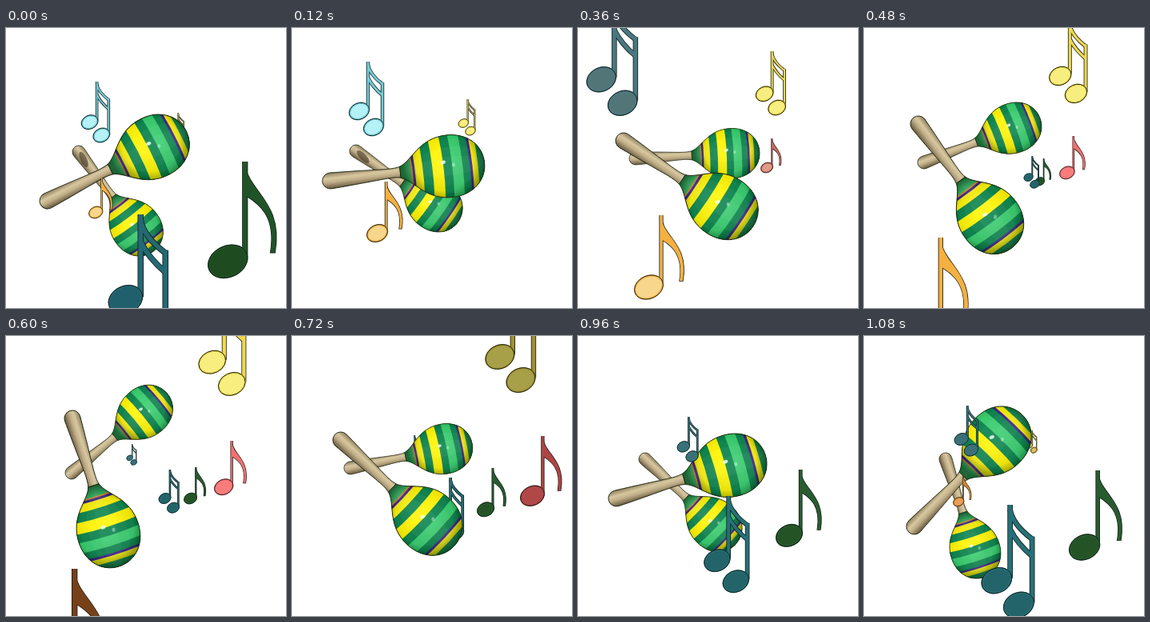
An HTML page with a canvas for the animation above (1200 ms loop, 350 px wide and 350 px high).

```html
<!DOCTYPE html>
<html lang="en">
<head>
<meta charset="utf-8">
<title>Maracas</title>
<style>
  html, body { margin: 0; width: 100%; height: 100%; overflow: hidden; background: #fff; }
  canvas { display: block; width: 350px; height: 350px; }
</style>
</head>
<body>
<canvas id="stage"></canvas>
<script>
const canvas = document.getElementById('stage');
const ctx = canvas.getContext('2d');
const ratio = window.devicePixelRatio || 1;
canvas.width = canvas.height = 350 * ratio;

const STEP = 120, STEPS = 10;

// Poses per step: knob x, knob y, angle in degrees.
const front = [[52, 216, -26.7], [48, 191, -7], [50, 166, 13], [57, 141, 33.4], [68, 120, 53],
  [83, 103, 72.5], [61, 130, 43], [50, 166, 13], [48, 203, -16], [63, 238, -46]];
const back = [[91, 155, 53], [80, 154, 34.5], [75, 157, 16], [72, 163, -3], [75, 168, -21],
  [82, 171, -39.6], [73, 165, -11.5], [75, 158, 16], [84, 154, 43.3], [102, 154, 72]];

// Each note: first step, age at which it passes in front of the maracas,
// age at which it brightens, [head, stem] colours, and left, top, height per step.
const notes = [
  { pair: true, first: 5, over: 3, bright: 5,
    colors: [['#3c7078', '#347880'], ['#b4f2f8', '#74ccd8'], ['#527678', '#487880']],
    path: [[151, 135, 26], [144, 124, 36], [135, 112, 46], [124, 101, 56], [113, 87, 63],
      [94, 67, 76], [71, 42, 93], [43, 12, 112], [10, -27, 137]] },
  { pair: true, first: 9, over: 99, bright: 1,
    colors: [['#d8c060', '#c8a840'], ['#f8ee80', '#f0d850'], ['#a8a048', '#a09030']],
    path: [[203, 118, 28], [206, 106, 36], [208, 89, 45], [215, 62, 61], [222, 29, 80],
      [231, -8, 102], [240, -52, 127], [241, -64, 135]] },
  { pair: false, first: 9, over: 0, bright: 1,
    colors: [['#e8a058', '#d88830'], ['#f8d68c', '#f4b040'], ['#784018', '#784018']],
    path: [[112, 175, 38], [104, 188, 50], [94, 192, 76], [82, 213, 91], [71, 234, 106],
      [56, 262, 128], [39, 291, 150]] },
  { pair: false, first: 2, over: 99, bright: 2,
    colors: [['#e09c88', '#c86860'], ['#f87c7c', '#f07070'], ['#b04848', '#b04444']],
    path: [[216, 142, 34], [229, 138, 43], [245, 135, 54], [261, 131, 68], [286, 125, 88]] },
  { pair: false, first: 4, over: 99, bright: 0,
    colors: [[], ['#245426', '#285c30'], ['#1e4c20', '#205428']],
    path: [[214, 163, 34], [223, 164, 46], [232, 165, 61], [240, 166, 79], [248, 167, 97],
      [257, 168, 113], [253, 167, 147]] },
  { pair: true, first: 4, over: 3, bright: 0,
    colors: [[], ['#22646a', '#267078'], ['#20606c', '#246874']],
    path: [[200, 160, 40], [191, 167, 54], [178, 177, 78], [168, 188, 100], [157, 200, 121],
      [146, 211, 142], [127, 233, 160]] }
];

const handle = new Path2D('M88-7C76-4 64-7 0-10A10 10 0 0 0 0 10C64 7 76 4 88 7Z');
const bulb = new Path2D('M88-7C104-12 115-39 150-39C176-39 194-22 194 0' +
  'C194 22 176 39 150 39C115 39 104 12 88 7Z');
const flag = new Path2D('M33 2C35 27 68 36 60 82L56 82C62 46 42 36 33 30Z');
const beams = new Path2D('M24 4Q26 16 42 28M24 20Q30 32 42 42');

const LIME = '#35cc6c', GREEN = '#07824a', YELLOW = '#fff200', PURPLE = '#3c1890';
const stripes = [[80, LIME], [101, '#e89030'], [103, PURPLE], [106, YELLOW], [116, GREEN],
  [128, YELLOW], [142, GREEN], [153, LIME], [166, GREEN], [175, PURPLE], [178, YELLOW], [185, GREEN]];

function blob(x, y, rx, ry, turn = 0) {
  ctx.beginPath();
  ctx.ellipse(x, y, rx, ry, turn, 0, 7);
}

function outline(path) {
  ctx.strokeStyle = '#1c2410';
  ctx.lineWidth = 0.9;
  ctx.stroke(path);
}

function drawHandle(shadow) {
  const wood = ctx.createLinearGradient(0, -10, 0, 10);
  [['0', '#8c7c5c'], ['.35', '#d8c8a0'], ['.6', '#c0ae88'], ['1', '#64563c']]
    .forEach(([at, color]) => wood.addColorStop(+at, color));
  ctx.fillStyle = wood;
  ctx.fill(handle);
  if (shadow) {
    ctx.fillStyle = 'rgba(60,48,28,.6)';
    blob(14, 1, 13, 5, 0.2);
    ctx.fill();
  }
  outline(handle);
}

function drawBulb(angle) {
  ctx.save();
  ctx.clip(bulb);
  for (const [x, color] of stripes) {
    ctx.fillStyle = color;
    ctx.beginPath();
    ctx.moveTo(x - 2, -45);
    ctx.quadraticCurveTo(x + 3, 0, x - 2, 45);
    ctx.lineTo(200, 45);
    ctx.lineTo(200, -45);
    ctx.fill();
  }
  // Lengthwise facets
  ctx.fillStyle = 'rgba(255,255,255,.045)';
  for (const s of [0.88, 0.62, 0.3]) {
    ctx.save();
    ctx.scale(1, s);
    ctx.fill(bulb);
    ctx.restore();
  }
  // Lighting stays fixed to the stage
  ctx.translate(148, 0);
  ctx.rotate(-angle);
  const shade = ctx.createRadialGradient(-6, -8, 14, -3, -4, 54);
  shade.addColorStop(0, 'rgba(0,30,10,0)');
  shade.addColorStop(0.55, 'rgba(0,30,10,.08)');
  shade.addColorStop(1, 'rgba(0,30,10,.6)');
  ctx.fillStyle = shade;
  ctx.fillRect(-90, -90, 180, 180);
  ctx.fillStyle = 'rgba(235,255,240,.85)';
  blob(-6, -5, 3.2, 2.2, -0.4);
  ctx.fill();
  ctx.fillStyle = 'rgba(235,255,240,.4)';
  blob(7, -2, 2, 2.6);
  ctx.fill();
  ctx.restore();
  outline(bulb);
}

function drawMaraca([x, y, degrees], size, shadow) {
  const angle = degrees * Math.PI / 180;
  ctx.save();
  ctx.translate(x, y);
  ctx.rotate(angle);
  ctx.scale(size, size);
  drawHandle(shadow);
  drawBulb(angle);
  ctx.restore();
}

function drawNote(note, age) {
  const [x, y, height] = note.path[age];
  const last = age === note.path.length - 1;
  const [head, stem] = note.colors[last ? 2 : age < note.bright ? 0 : 1];
  const unit = height / (note.pair ? 93 : 106);
  const heads = note.pair ? [[13, 62], [31, 82]] : [[17.5, 90]];
  const stems = note.pair ? [[24, 0, 60], [42, 26, 80]] : [[33, 0, 86]];
  const [rx, ry] = note.pair ? [12.4, 9.6] : [18, 13.6];
  const edge = Math.min(1, 0.5 + height / 160) / unit;
  ctx.save();
  ctx.translate(x, y);
  ctx.scale(unit, unit);

  // A dark pass first, then a slimmer coloured one
  for (const dark of [true, false]) {
    const ink = dark ? '#141c18' : stem;
    ctx.strokeStyle = ctx.fillStyle = ink;
    const weight = (note.pair ? 4.4 : 5.2) - (dark ? 0 : edge * 1.6);
    ctx.lineWidth = Math.max(weight, 1.6);
    ctx.beginPath();
    for (const [sx, top, bottom] of stems) {
      ctx.moveTo(sx, top);
      ctx.lineTo(sx, bottom);
    }
    ctx.stroke();
    if (note.pair) {
      ctx.stroke(beams);
    } else {
      ctx.fill(flag);
      if (dark) {
        ctx.lineWidth = edge * 1.4;
        ctx.stroke(flag);
      }
    }
  }
  for (const [hx, hy] of heads) {
    blob(hx, hy, rx, ry, -0.44);
    ctx.fillStyle = head;
    ctx.fill();
    ctx.strokeStyle = stem;
    ctx.lineWidth = edge * 2.4;
    ctx.stroke();
    ctx.strokeStyle = '#141c18';
    ctx.lineWidth = edge;
    blob(hx, hy, rx + edge * 0.6, ry + edge * 0.6, -0.44);
    ctx.stroke();
  }
  ctx.restore();
}

function drawNotes(step, inFront) {
  for (const note of notes) {
    const age = (step - note.first + STEPS) % STEPS;
    if (age < note.path.length && age >= note.over === inFront) drawNote(note, age);
  }
}

const start = performance.now();

function render() {
  const step = Math.floor((performance.now() - start) / STEP) % STEPS;
  ctx.setTransform(ratio, 0, 0, ratio, 0, 0);
  ctx.fillStyle = '#fff';
  ctx.fillRect(0, 0, 350, 350);
  drawNotes(step, false);
  drawMaraca(back[step], 0.8, step < 2);
  drawMaraca(front[step], 1, false);
  drawNotes(step, true);
  requestAnimationFrame(render);
}
render();
</script>
</body>
</html>
```
